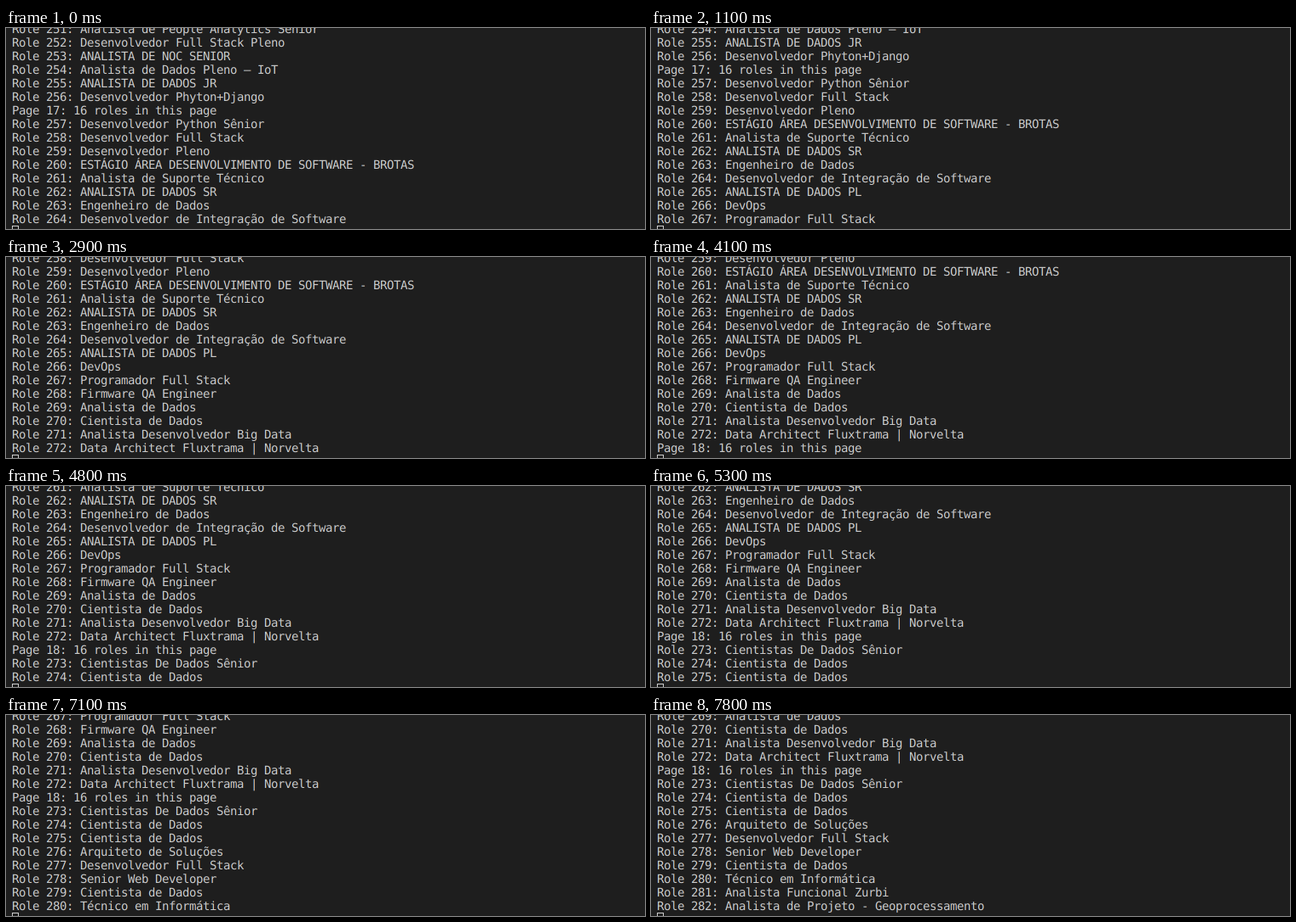
An HTML page with a canvas for the animation above (8 s loop, 750 px wide and 237 px high).

```html
<!DOCTYPE html>
<html lang="pt">
<head>
<meta charset="utf-8">
<title>Terminal</title>
<style>
  html, body {
    margin: 0;
    width: 100%;
    height: 100%;
    overflow: hidden;
    background: #1e1e1e;
  }
  canvas { display: block; }
</style>
</head>
<body>
<canvas id="term" width="750" height="237"></canvas>
<script>
const LOOP = 8000, ROWS = 15, FIRST_ROLE = 251, PAGE_SIZE = 16;
const LEFT = 7, CELL_W = 8, CELL_H = 16, BASELINE = 6;

const roles = [
  'Analista de People Analytics Senior',
  'Desenvolvedor Full Stack Pleno',
  'ANALISTA DE NOC SENIOR',
  'Analista de Dados Pleno – IoT',
  'ANALISTA DE DADOS JR',
  'Desenvolvedor Phyton+Django',
  'Desenvolvedor Python Sênior',
  'Desenvolvedor Full Stack',
  'Desenvolvedor Pleno',
  'ESTÁGIO ÁREA DESENVOLVIMENTO DE SOFTWARE - BROTAS',
  'Analista de Suporte Técnico',
  'ANALISTA DE DADOS SR',
  'Engenheiro de Dados',
  'Desenvolvedor de Integração de Software',
  'ANALISTA DE DADOS PL',
  'DevOps',
  'Programador Full Stack',
  'Firmware QA Engineer',
  'Analista de Dados',
  'Cientista de Dados',
  'Analista Desenvolvedor Big Data',
  'Data Architect Fluxtrama | Norvelta',
  'Cientistas De Dados Sênior',
  'Cientista de Dados',
  'Cientista de Dados',
  'Arquiteto de Soluções',
  'Desenvolvedor Full Stack',
  'Senior Web Developer',
  'Cientista de Dados',
  'Técnico em Informática',
  'Analista Funcional Zurbi',
  'Analista de Projeto - Geoprocessamento'
];

// Each page header follows the last role of the page before it.
const lines = roles.flatMap((role, i) => {
  const n = FIRST_ROLE + i;
  const line = `Role ${n}: ${role}`;
  return n % PAGE_SIZE
    ? [line]
    : [line, `Page ${n / PAGE_SIZE + 1}: ${PAGE_SIZE} roles in this page`];
});

// Times in ms at which one more line is printed.
const prints = [
  300, 700, 1100, 1500, 1900, 2200, 2500, 2900, 4100, 4500,
  4800, 5300, 5500, 5900, 6300, 6700, 7100, 7500, 7800
];

// LCD text: each colour channel is drawn a third of a pixel apart.
const channels = [
  { color: '#cc1e1e', dx: 1 / 3 },
  { color: '#1ecc1e', dx: 0 },
  { color: '#1e1ecc', dx: -1 / 3 }
];

const canvas = document.getElementById('term');
const ctx = canvas.getContext('2d');
ctx.font = '14px "DejaVu Sans Mono", monospace';
ctx.textRendering = 'geometricPrecision';
ctx.letterSpacing = `${CELL_W - ctx.measureText('0').width}px`;

function paint(top) {
  ctx.globalCompositeOperation = 'source-over';
  ctx.fillStyle = '#1e1e1e';
  ctx.fillRect(0, 0, canvas.width, canvas.height);
  ctx.strokeStyle = '#ccc';
  ctx.strokeRect(LEFT + 0.5, 233.5, CELL_W - 1, CELL_H - 1);

  ctx.globalCompositeOperation = 'lighten';
  for (const { color, dx } of channels) {
    ctx.fillStyle = color;
    lines.slice(top, top + ROWS).forEach((line, row) => {
      ctx.fillText(line, LEFT + dx, BASELINE + row * CELL_H);
    });
  }
}

const start = performance.now();
let shown = -1;

function draw() {
  const t = (performance.now() - start) % LOOP;
  const top = prints.filter(p => p <= t).length;
  if (top !== shown) paint(shown = top);
  requestAnimationFrame(draw);
}
draw();
</script>
</body>
</html>
```
